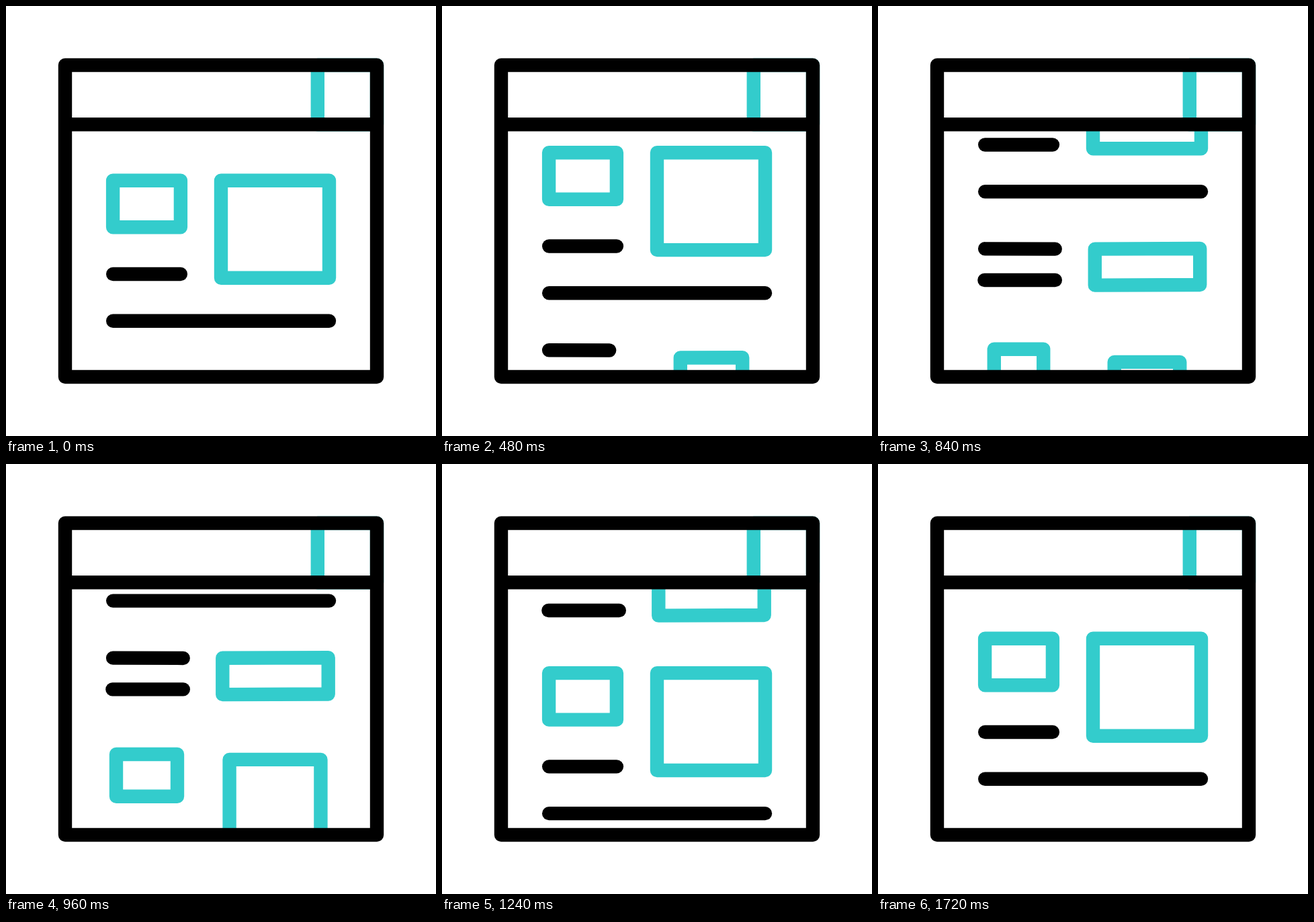
An HTML page for the animation above (2000 ms loop, 640 by 640 pixels).

```html
<!DOCTYPE html>
<html lang="en">
<head>
<meta charset="utf-8">
<title>Scrolling page</title>
<style>
  html, body { margin: 0; width: 100%; height: 100%; overflow: hidden; background: #fff; }
  svg { display: block; width: 100vw; height: 100vh; }
  path { fill: none; stroke: #000; stroke-width: 20.4; stroke-linecap: round; stroke-linejoin: round; }
  .teal { stroke: #33cccc; }
</style>
</head>
<body>
<svg viewBox="0 0 640 640">
  <clipPath id="view"><rect x="88" y="176" width="464" height="376"/></clipPath>
  <g clip-path="url(#view)"><g id="page"></g></g>
  <path class="teal" d="M463.8 88H552V176.2H463.8Z"/>
  <path d="M88 88H552V552H88ZM88 176.3H552"/>
</svg>
<script>
const LOOP = 2000, STEP = 40, SCROLL = 434;
const page = document.getElementById('page');

const box = (x1, y1, x2, y2, tilt = 0) => ({
  pts: [[x1, y1 + tilt], [x2, y1 - tilt], [x2, y2 - tilt], [x1, y2 + tilt]],
  pivot: [(x1 + x2) / 2, (y1 + y2) / 2], closed: true
});
const line = (x1, x2, y, tilt = 0) => ({
  pts: [[x1, y - tilt], [x2, y + tilt]], pivot: [x1, y - tilt], closed: false
});
const section = y => [
  box(159.1, y + 259.8, 259.9, y + 329.3),
  box(320, y + 259.8, 481, y + 404.7),
  line(159.2, 259.9, y + 399),
  line(159.2, 481, y + 468.8)
];

// Parts that grow in: start and duration in ms
const middle = [
  [line(159.1, 263.7, 554, .15), 47, 690],
  [line(158.4, 263.8, 600.6), 74, 690],
  [box(322.3, 553.7, 479.7, 608, .3), 252, 638]
];
const timing = [[564, 576], [648, 516], [660, 544], [700, 544]];
const lower = section(SCROLL).map((shape, i) => [shape, ...timing[i]]);

function add(shape, start, dur) {
  const el = document.createElementNS('http://www.w3.org/2000/svg', 'path');
  if (shape.closed) el.setAttribute('class', 'teal');
  page.append(el);
  return { el, shape, start, dur };
}

function place({ el, shape }, k) {
  const [px, py] = shape.pivot;
  const pts = shape.pts.map(([x, y]) => [px + (x - px) * k, py + (y - py) * k]);
  el.setAttribute('d', 'M' + pts.join('L') + (shape.closed ? 'Z' : ''));
  el.style.visibility = k > 0 ? 'visible' : 'hidden';
}

section(0).forEach(shape => place(add(shape), 1));
const growing = [...middle, ...lower].map(item => add(...item));

const clamp = v => Math.min(1, Math.max(0, v));
const easeOut = x => 1 - (1 - x) ** 2;

// cubic-bezier(.58, 0, .42, 1), solved by bisection
function easeInOut(x) {
  if (x <= 0 || x >= 1) return clamp(x);
  let lo = 0, hi = 1, s;
  for (let i = 0; i < 30; i++) {
    s = (lo + hi) / 2;
    const bx = 1.74 * s * (1 - s) ** 2 + 1.26 * s * s * (1 - s) + s ** 3;
    if (bx < x) lo = s; else hi = s;
  }
  return s * s * (3 - 2 * s);
}

function draw(now) {
  const t = Math.floor((now % LOOP) / STEP) * STEP;
  const y = SCROLL * easeInOut((t - 40) / 1680);
  page.setAttribute('transform', `translate(0 ${-y.toFixed(3)})`);
  for (const g of growing) place(g, easeOut(clamp((t - g.start) / g.dur)));
}

function tick(now) {
  draw(now);
  requestAnimationFrame(tick);
}
draw(0);
requestAnimationFrame(tick);
</script>
</body>
</html>
```
